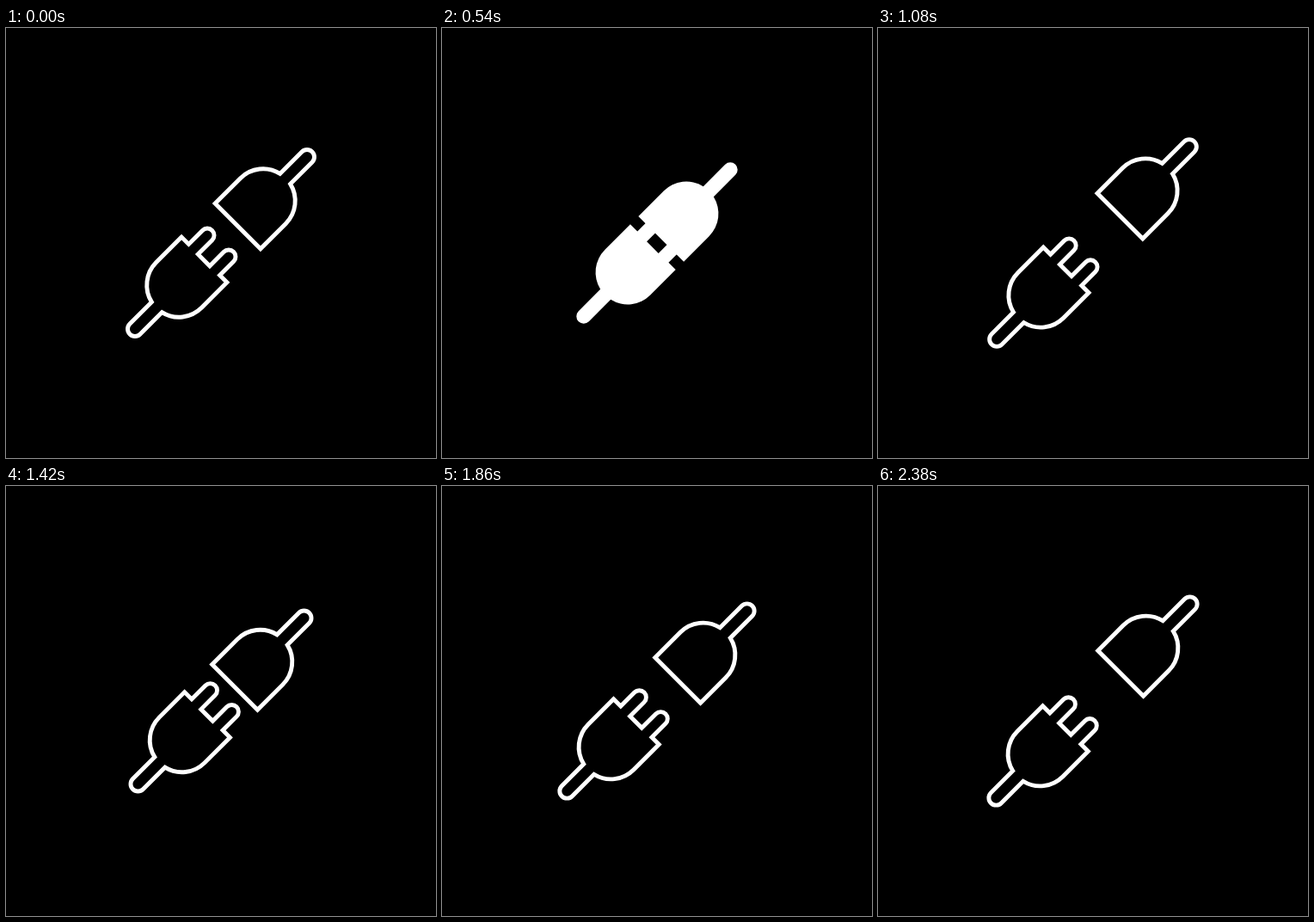
An HTML page that plays this animation: 500x500 px, repeating every 2400 ms.

```html
<!DOCTYPE html>
<html lang="en">
<head>
<meta charset="utf-8">
<title>Plug and socket</title>
<style>
  @property --d {
    syntax: "<number>";
    inherits: true;
    initial-value: 0;
  }
  html, body {
    margin: 0;
    width: 100%;
    height: 100%;
    overflow: hidden;
    background: #000;
  }
  svg {
    display: block;
    width: 100%;
    height: 100%;
    animation: slide 2400ms infinite, power 2400ms step-end infinite;
  }
  path { stroke-width: 4.9; stroke-miterlimit: 10; }
  .socket { transform: translateX(calc(var(--d) * 1.4142px)); }
  .plug { transform: translateX(calc(var(--d) * -1.4142px)); }

  /* Half the gap between the parts, along each screen axis */
  @keyframes slide {
    0%       { --d: 0;     animation-timing-function: cubic-bezier(.333, .305, .667, .657); }
    10%      { --d: -10.5; animation-timing-function: cubic-bezier(.333, .573, .667, 1); }
    18.75%   { --d: -16;   animation-timing-function: cubic-bezier(.333, 0, .667, .445); }
    31.667%  { --d: -5.2;  animation-timing-function: cubic-bezier(.333, .36, .667, .845); }
    45%      { --d: 11.8;  animation-timing-function: cubic-bezier(.333, .583, .667, 1); }
    47.917%  { --d: 12.6;  animation-timing-function: cubic-bezier(.333, 0, .667, 1); }
    61.667%  { --d: -5;    animation-timing-function: cubic-bezier(.333, 0, .667, .136); }
    69.167%  { --d: -2.4;  animation-timing-function: cubic-bezier(.333, .384, .667, .808); }
    85.833%  { --d: 9.8;   animation-timing-function: cubic-bezier(.333, .68, .667, 1); }
    100%     { --d: 12.6; }
  }
  /* Solid while the prongs are in contact */
  @keyframes power {
    0%, 29%, 100% { fill: none; stroke: #fff; }
    8%            { fill: #fff; stroke: none; }
  }
</style>
</head>
<body>
<svg viewBox="0 0 500 500">
  <g transform="translate(250 250) rotate(-45)">
    <path class="socket" d="M27.7-37.3H69.3A37.3 37.3 0 0 1 105.6-8.5H141.5a8.5 8.5 0 0 1 0 17H105.6A37.3 37.3 0 0 1 69.3 37.3H27.7Z"/>
    <path class="plug" d="M-27.6-37.3H-69.3A37.3 37.3 0 0 0-105.6-8.5H-141.5a8.5 8.5 0 0 0 0 17H-105.6A37.3 37.3 0 0 0-69.3 37.3H-27.6V25.6H-5a8 8 0 0 0 0-16H-28.2V-9.6H-5a8 8 0 0 0 0-16H-27.6Z"/>
  </g>
</svg>
</body>
</html>
```
